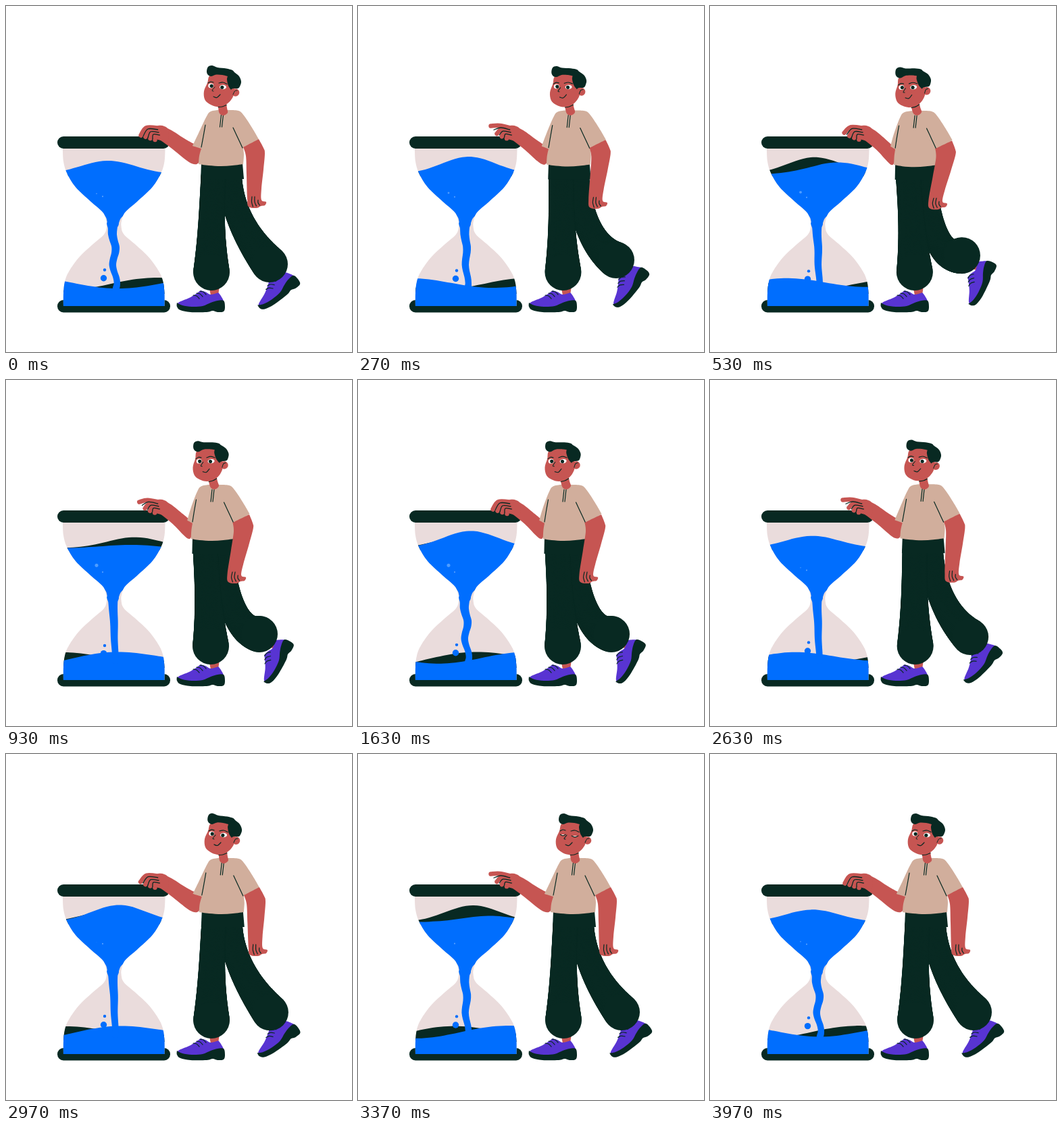
These frames come from a looping animation (512 by 512 pixels, 4000 ms). An HTML page with a canvas:

```html
<!DOCTYPE html>
<html lang="en">
<head>
<meta charset="utf-8">
<title>Hourglass</title>
<style>
html, body { margin: 0; width: 100%; height: 100%; overflow: hidden; background: #fff; }
canvas { display: block; width: 100%; height: 100%; }
</style>
</head>
<body>
<canvas id="stage" width="512" height="512"></canvas>
<script>
const ctx = document.getElementById('stage').getContext('2d');
const LOOP = 4000, TAU = Math.PI * 2;
const DARK = '#082922', BLUE = '#006efe', GLASS = '#eadcdc', SKIN = '#c65552',
      SHIRT = '#d1ae9c', SHOE = '#5834d2', WHITE = '#fff';

const mix = (a, b, k) => a + (b - a) * k;
const clamp = v => Math.max(0, Math.min(1, v));
const wave = turns => Math.cos(TAU * turns);

// "x y" pairs; "!" after a pair marks a sharp corner
const cache = {};
function pts(s) {
  return cache[s] || (cache[s] = s.match(/[-\d.]+ [-\d.]+!?/g).map(m => {
    const [x, y] = m.replace('!', '').split(' ').map(Number);
    return { x, y, c: m.endsWith('!') };
  }));
}
const list = s => typeof s === 'string' ? pts(s) : s;

function trace(shape, closed = true) {
  const all = list(shape), n = all.length;
  const at = i => closed ? all[(i + n) % n] : all[Math.max(0, Math.min(n - 1, i))];
  const tan = i => {
    const p = at(i), a = at(i - 1), b = at(i + 1);
    return p.c ? [0, 0] : [(b.x - a.x) / 6, (b.y - a.y) / 6];
  };
  ctx.beginPath();
  ctx.moveTo(all[0].x, all[0].y);
  for (let i = 0; i < (closed ? n : n - 1); i++) {
    const p = at(i), q = at(i + 1), u = tan(i), v = tan(i + 1);
    ctx.bezierCurveTo(p.x + u[0], p.y + u[1], q.x - v[0], q.y - v[1], q.x, q.y);
  }
  if (closed) ctx.closePath();
}

function fill(shape, color) {
  trace(shape);
  ctx.fillStyle = color;
  ctx.fill();
}

function line(shape, width = 1.2, color = DARK) {
  trace(shape, false);
  ctx.strokeStyle = color;
  ctx.lineWidth = width;
  ctx.stroke();
}

function oval(x, y, rx, ry, color) {
  ctx.beginPath();
  ctx.ellipse(x, y, rx, ry, 0, 0, TAU);
  ctx.fillStyle = color;
  ctx.fill();
}
const dot = (x, y, r, color) => oval(x, y, r, r, color);

function bar(x, y, w, h) {
  ctx.beginPath();
  ctx.roundRect(x, y, w, h, 9);
  ctx.fillStyle = DARK;
  ctx.fill();
}

// Cosine steps between extremes
function ease(keys, t) {
  let i = 0;
  while (i < keys.length - 2 && t > keys[i + 1][0]) i++;
  const [t0, a] = keys[i], [t1, b] = keys[i + 1];
  return mix(a, b, (1 - wave(clamp((t - t0) / (t1 - t0)) / 2)) / 2);
}

// Upper surface: one swell that rises while it drifts right
function swell(x, u) {
  const crest = 173 - 22 * wave(u - .02);
  const height = 15.5 + 10.5 * wave(u - .18);
  return 249 - height * Math.exp(-(((x - crest) / 57) ** 2));
}

// Lower surface: a long wave running right
function ripple(x, u) {
  const k = (x - 85) / 150;
  return mix(412, 409, k) - mix(9, 7, k) * wave(u - .16 - .58 * k);
}

function surface(rule, u) {
  const out = [];
  for (let x = 83; x <= 237; x += 11) out.push({ x, y: rule(x, u) });
  out[0].c = out[out.length - 1].c = true;
  return out;
}

// Falling liquid narrows and wobbles on the way down
function stream(u) {
  const left = [], right = [];
  const sway = 1.6 + 1.4 * wave(u - .9);
  for (let y = 320; y <= 419; y += 9) {
    const k = (y - 320) / 99;
    const mid = 158 + 4 * k + sway * Math.min(1, 3 * k) * Math.sin(TAU * (y - 346) / 50);
    const half = 8 - 3.5 * Math.sqrt(k);
    left.push({ x: mid - half, y });
    right.unshift({ x: mid + half, y });
  }
  return [...left, ...right];
}

const side = pts('84 211! 85 230 90 247 103 268 125 289 143 305 148 316 149 326 145 338 128 353 ' +
  '108 372 93 393 87 408 85 425 85 444!');
const glass = [...side, ...side.map(p => ({ ...p, x: 319.5 - p.x })).reverse()];
const funnel = pts('245 250! 199 291 182 304 170 314 166 326! 150 324! 148 313 139 303! 80 265!');

function hourglass(t) {
  const up = t * 3 / LOOP, low = t * 2 / LOOP;
  const bob = Math.sin(TAU * t / LOOP), puff = wave((t - 1280) / LOOP);
  bar(76, 193, 166, 18);
  bar(76, 435, 167, 18.5);
  fill(glass, GLASS);
  ctx.save();
  trace(glass);
  ctx.clip();
  fill([...surface(swell, up - .28), ...pts('235 252! 85 252!')], DARK);
  fill([...surface(swell, up), ...funnel], BLUE);
  dot(134, 276.5 - 2.5 * puff, 1.4 + 1.3 * puff, '#4f9dff');
  dot(143, 282.5 + 2 * puff, 1, '#63a8ff');

  fill([...surface(ripple, low - .31), ...pts('237 426! 83 426!')], DARK);
  fill([...surface(ripple, low), ...pts('237 446! 83 446!')], BLUE);
  fill(stream(low), BLUE);
  dot(146, 390.5 + 2.5 * bob, 2.2, BLUE);
  dot(144.5, 402.7 + 2 * bob, 4.7, BLUE);
  ctx.restore();
}

// Shoe with its toe at the local origin
function shoe(x, y, deg) {
  ctx.save();
  ctx.translate(x, y);
  ctx.rotate(deg * Math.PI / 180);
  fill('47 -33! 63 -33! 61 -19! 50 -19!', SKIN);
  fill('2 -8 18 -15 28 -21 35 -26! 42 -24 50 -20 61 -23! 65 -18 69 -8 58 -3 45 1 22 1 4 -2', SHOE);
  fill('0 -8! 8 -4 22 -2 38 -3 50 -8 60 -11 69 -11 71 -2 69 5 60 6 53 4 44 6 20 6 5 3 0 -2', DARK);
  for (let i = 0; i < 3; i++) {
    const a = 24 + 5 * i, b = -19 - 3 * i;
    line([{ x: a, y: b }, { x: a + 5, y: b + 1 }, { x: a + 9, y: b + 5 }]);
  }
  ctx.restore();
}

// Trouser leg: discs along a bent spine, flaring at the hem
function leg(x0, y0, x1, y1, x2, y2, slim) {
  for (let i = 0; i <= 80; i++) {
    const t = i / 80, s = 1 - t;
    dot(s * s * x0 + 2 * s * t * x1 + t * t * x2,
        s * s * y0 + 2 * s * t * y1 + t * t * y2,
        mix(slim, 27, t ** 2.7), DARK);
  }
}

// The resting hand stays put; the rest of the upper body follows the lean
const torso = (shape, p) => list(shape).map(q =>
  ({ ...q, x: q.x - 13.5 * p * clamp((q.x - 232) / 58) ** 2, y: q.y + p * clamp((q.x - 232) / 58) }));
const swing = (shape, p) => list(shape).map(q =>
  ({ ...q, x: q.x - p * (14 + 16 * clamp((q.y - 200) / 88)), y: q.y + 2 * p }));

function finger(i, lift) {
  const raise = lift / (1 + 2 * i);
  return [
    { x: 228 + 1.3 * i, y: 181 + 4 * i },
    { x: 208 + 4 * i + 2 * raise, y: 180 + 4 * i - 3 * raise },
    { x: 199.5 + 7 * i - 3 * raise, y: 191.5 + 2.2 * i - 14 * raise }
  ];
}

function reach(p, lift) {
  fill(torso('230 177! 245 184 267 198 288 209! 292 218! 285 232 278 234 268 229 248 213 232 201 224 195!', p), SKIN);
  const fingers = [0, 1, 2, 3].map(i => finger(i, lift));
  fingers.forEach(f => line(f, 6.5, SKIN));
  fill('240 183 231 177 221 178 212 184 215 194 229 199 239 202', SKIN);
  for (let i = 0; i < 3; i++) {
    line(fingers[i].map((f, j) => {
      const next = fingers[i + 1][j];
      return { x: (f.x + next.x) / 2 - (j ? 0 : 4), y: (f.y + next.y) / 2 };
    }), 1.3);
  }
}

function eye(x, y, rx, ry, look, open) {
  if (open > .15) {
    oval(x, y, rx, ry * open, WHITE);
    oval(x + look, y + .3, 2.6, Math.min(2.6, ry * open), DARK);
  } else {
    oval(x, y + 1.5, rx - .8, .6, WHITE);
    line([{ x: x - rx, y: y + 1 }, { x, y: y + 3 }, { x: x + rx, y: y + 1 }], 1);
  }
}

function head(p, open) {
  ctx.save();
  ctx.translate(mix(320, 307, p), 158);
  ctx.rotate(-.115 * p);
  ctx.translate(-320, -158);
  fill('314 142! 326 142! 327 151 328 158 322 162 316 159 314 150', SKIN);
  line('314 149.5 320 149 326 146.5');
  dot(339.5, 128, 5.8, SKIN);
  fill('303 102 298 114 293 126 294 138 301 145 312 149 325 146 333 139 337 130 337 112 326 100', SKIN);
  fill('297 97 299 90 305 88 313 91 326 92.5 335 95 338 98 345 104 348 112 346 119 343 122 336 122 ' +
    '333 124! 329 118 327 109 328 104! 320 102 311 101.5 304 104 299 102', DARK);
  line('336 131 338.5 126 342 125', 1);
  eye(303.2, 118, 4, 3.4, 1, open);
  eye(321, 120, 5, 3.2, -1.2, open);
  line('299 114 303 112 307 113');
  line('315 114 321 113 327 115.5');
  line('309 120 305 125 307 126', 1);
  line('307 134 312 135.5 317 131');
  ctx.restore();
}

function person(t) {
  const p = ease([[30, 0], [530, 1.14], [930, 1], [2190, 1], [2940, -.06], [3400, 0]], t);
  const hop = ease([[30, 0], [530, -6], [930, 0]], t);
  const lift = ease([[.04, 0], [.22, 1], [.32, 1], [.85, 0]], t / 800 % 1);
  const open = clamp((Math.abs(t % 2000 - 1370) - 60) / 70);

  shoe(mix(377, 388, p), mix(449, 450, p) + hop, mix(-37, -61, p));
  shoe(253, 447, 0);
  leg(331 - 13 * p, 252, 335 - 5 * p, 320 + 52 * p, 390 - 15 * p, 382 - 6 * p + hop, 18);
  leg(307 - 12 * p, 252, 303 - 4 * p, 320, 304 - p, 394, 18.5);
  fill(torso('289 233! 350 233! 352 256! 288 256!', p), DARK);

  reach(p, lift);
  fill(torso('314 154! 303 156 297 163 285 188 276 207! 289 211! 286 222 285 234! 300 236 318 237 335 236 ' +
    '351 234! 352 220 351 210! 362 205 374 197! 364 180 352 162 344 155 328 154!', p), SHIRT);
  ['295 176 292 193 289 209', '336 180 343 195 350 210', '318.5 161 316.5 179', '321.5 161 319.5 179']
    .forEach(s => line(torso(s, p)));
  fill(swing('351 209! 374 197! 381 210 383 218 381 242 378 270 378 287 385 290 383 295 377 296 371 299 ' +
    '359 297 357 285 356 250 355 222', p), SKIN);
  ['364 282 363.5 290 365.5 297', '368 282 368 290 370.5 296', '373 287 373 291 375.5 295']
    .forEach(s => line(swing(s, p)));
  head(p, open);
}

function frame(now) {
  const t = now % LOOP;
  ctx.fillStyle = WHITE;
  ctx.fillRect(0, 0, 512, 512);
  ctx.lineCap = ctx.lineJoin = 'round';
  hourglass(t);
  person(t);
  requestAnimationFrame(frame);
}
frame(performance.now());
</script>
</body>
</html>
```
